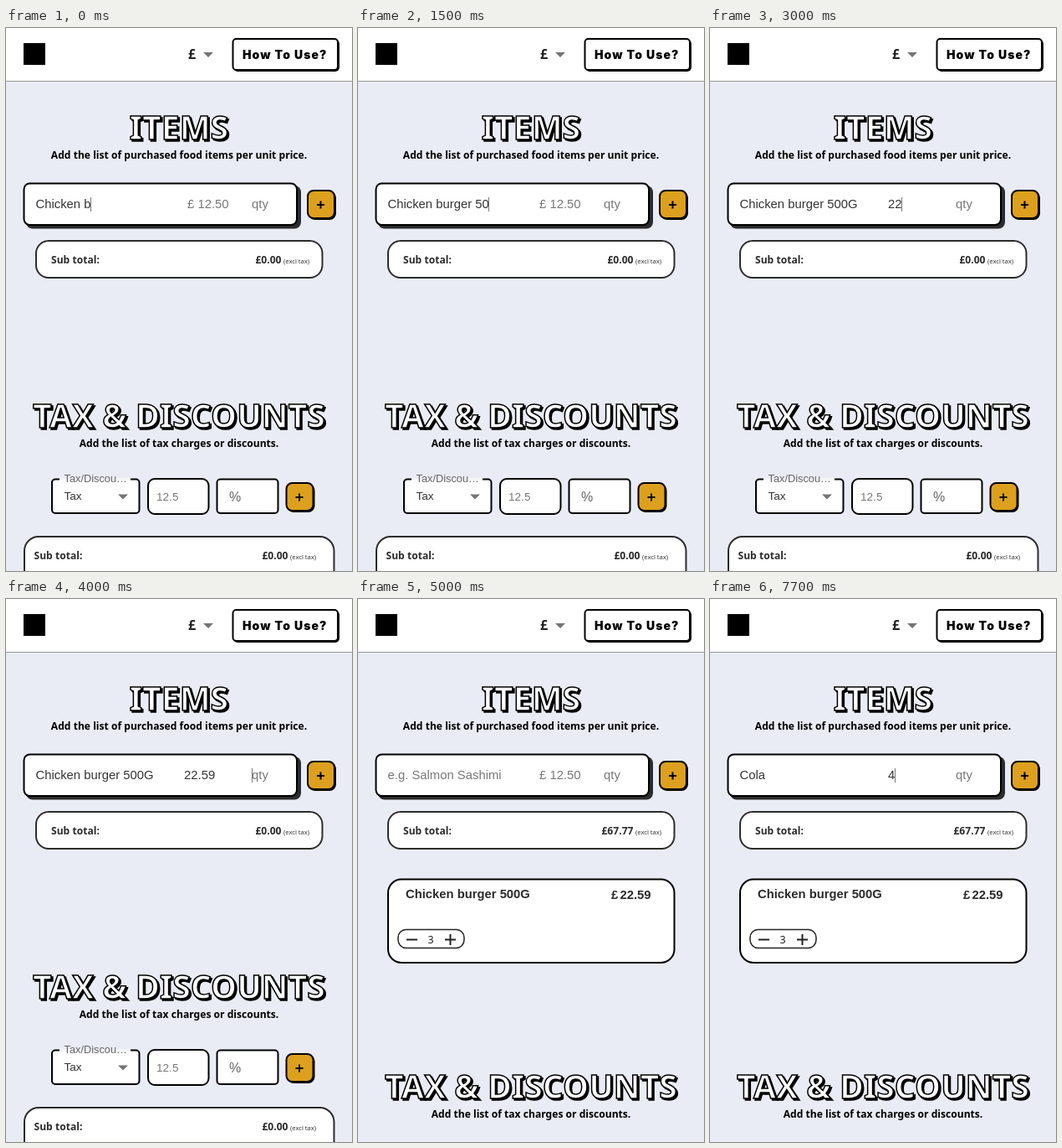
These frames come from a looping animation (414x648 px, 8 s). An HTML page:

```html
<!DOCTYPE html>
<html lang="en">
<head>
<meta charset="utf-8">
<title>Bill items</title>
<style>
  html, body { margin: 0; width: 100%; height: 100%; overflow: hidden; background: #e9ecf4; }
  svg { display: block; width: 414px; height: 648px; }
  .box { fill: #fff; stroke: #000; stroke-width: 2; }
  .soft { stroke: #2c2c2c; }
  .gold { fill: #dda01e; }
  .shade { fill: #2c2c2c; }
  .bold { font: 700 12.1px "Noto Sans", sans-serif; }
  .total { fill: #2b2b2b; }
  .tiny { font: 500 7.6px "Noto Sans", sans-serif; fill: #333; }
  .title { font: 700 39.2px "Noto Sans", sans-serif; text-anchor: middle; stroke: #000; stroke-width: 1.5; }
  .title .front { fill: #fff; }
  .sub { text-anchor: middle; }
  .field { font: 14.85px "Liberation Sans", Arial, sans-serif; fill: #333; }
  .small { font: 13.6px "Liberation Sans", Arial, sans-serif; fill: #333; }
  .label { font-size: 12.8px; fill: #666; }
  .hint { fill: #777; }
  .card { font: 700 14.8px "Liberation Sans", Arial, sans-serif; fill: #2b2b2b; }
  .end { text-anchor: end; }
  .grey { fill: #757575; }
  .how { font: 900 14px Inter, sans-serif; letter-spacing: 1.1px; }
  .line { stroke: #222; stroke-width: 2; fill: none; }
</style>
</head>
<body>
<svg viewBox="0 0 414 648">
  <defs>
    <g id="add">
      <rect x="2" y="2" width="33" height="34" rx="8"/>
      <rect class="box gold" x="1" y="1" width="32" height="33" rx="7"/>
      <path d="M12 18h9M16.500 13.500v9" stroke="#000" stroke-width="2"/>
    </g>
  </defs>

  <path d="M0 0h414v63H0z" fill="#fff"/>
  <path d="M0 63.500h414" stroke="#999"/>
  <rect x="21" y="18" width="26" height="26"/>
  <text x="218" y="37" style="font:600 16px 'Noto Sans',sans-serif" fill="#222">£</text>
  <path class="grey" d="M236 29h12l-6 6z"/>
  <rect x="272" y="14" width="127" height="38" rx="5"/>
  <rect class="box" x="271.500" y="13" width="125.500" height="37" rx="4"/>
  <text class="how" x="283" y="36.500">How To Use?</text>

  <g class="title" transform="translate(207 132.500)">
    <text x="2" y="2">ITEMS</text><text class="front">ITEMS</text>
  </g>
  <text class="bold sub" x="207" y="156">Add the list of purchased food items per unit price.</text>

  <rect class="shade" x="24" y="188" width="329" height="51.500" rx="8"/>
  <rect class="box" x="21.500" y="185.500" width="326.500" height="49.500" rx="7"/>
  <text class="field" id="name" x="35.500" y="215"></text>
  <text class="field" id="price" y="215"></text>
  <text class="field" id="qty" x="294" y="215"></text>
  <path id="caret" d="M.5 202v17" stroke="#777"/>
  <use href="#add" x="360" y="193"/>

  <rect class="box soft" x="36" y="254" width="342.500" height="44" rx="15"/>
  <text class="bold total" x="54" y="281">Sub total:</text>
  <text class="bold total end" id="sum" x="329.500" y="281"></text>
  <text class="tiny" x="332" y="281">(excl tax)</text>

  <g id="card">
    <rect class="box" x="36" y="334.500" width="342.500" height="99.500" rx="16"/>
    <text class="card" x="57" y="357">Chicken burger 500G</text>
    <text class="card" x="303" y="358">£</text>
    <text class="card end" x="350.500" y="358">22.59</text>
    <rect class="box" x="48" y="394.500" width="79" height="22" rx="9.500" style="stroke:#222;stroke-width:1.500"/>
    <path class="line" d="M58 406.500h13M104 406.500h13M110.500 400v13"/>
    <text x="83.500" y="411" style="font:12.500px 'Noto Sans',sans-serif" fill="#222">3</text>
  </g>

  <g id="tax">
    <g class="title" transform="translate(207 477)">
      <text x="2" y="2">TAX &amp; DISCOUNTS</text><text class="front">TAX &amp; DISCOUNTS</text>
    </g>
    <text class="bold sub" x="207" y="500">Add the list of tax charges or discounts.</text>

    <rect class="box" x="55" y="538.500" width="104.500" height="40.500" rx="4"/>
    <path d="M64 538.500h85" stroke="#f4f5f9" stroke-width="3"/>
    <text class="small label" x="69.500" y="542">Tax/Discou…</text>
    <text class="small" x="69.500" y="563">Tax</text>
    <path class="grey" d="M134 556.500h12l-6 6z"/>
    <rect class="box" x="170" y="538" width="72.500" height="42" rx="8"/>
    <text class="small hint" x="180" y="564">12.5</text>
    <rect class="box" x="252.500" y="538.500" width="73" height="40.500" rx="4"/>
    <text class="field" x="267" y="565" style="font-size:16px;fill:#666">%</text>
    <use href="#add" x="334.500" y="542"/>

    <rect class="box soft" x="22" y="607" width="370.500" height="80" rx="17"/>
    <text class="bold total" x="33.500" y="634">Sub total:</text>
    <text class="bold total end" x="337.500" y="634">£0.00</text>
    <text class="tiny" x="340" y="634">(excl tax)</text>
  </g>
</svg>
<script>
const LOOP = 8000, ADDED = 5000;
const $ = id => document.getElementById(id);
const hints = { name: 'e.g. Salmon Sashimi', price: '£ 12.50', qty: 'qty' };

// Each entry: time, focused field, its new value.
const typing = [
  [0, 'name', 'Chicken b'], [200, 'name', 'Chicken bu'], [400, 'name', 'Chicken bur'],
  [600, 'name', 'Chicken burg'], [700, 'name', 'Chicken burge'], [900, 'name', 'Chicken burger'],
  [1100, 'name', 'Chicken burger '], [1300, 'name', 'Chicken burger 5'], [1500, 'name', 'Chicken burger 50'],
  [1700, 'name', 'Chicken burger 500'], [1900, 'name', 'Chicken burger 500G'],
  [2300, 'price', ''], [2700, 'price', '2'], [2900, 'price', '22'], [3200, 'price', '22.'],
  [3600, 'price', '22.5'], [4000, 'price', '22.59'], [4000, 'qty', ''], [4600, 'qty', '3'],
  [ADDED, null], [5900, 'name', ''],
  [6600, 'name', 'C'], [6700, 'name', 'Co'], [7000, 'name', 'Col'], [7200, 'name', 'Cola'],
  [7500, 'price', ''], [7700, 'price', '4']
];

function draw(now) {
  const t = now % LOOP, added = t >= ADDED;
  let values = {}, focus = null;
  for (const [time, field, value] of typing) {
    if (time > t) break;
    focus = field;
    if (field) values[field] = value;
    else values = {};
  }
  for (const id in hints) {
    $(id).textContent = values[id] || hints[id];
    $(id).classList.toggle('hint', !values[id]);
  }
  $('price').setAttribute('x', values.price ? 213 : 217);

  $('caret').style.display = focus ? '' : 'none';
  if (focus) {
    const text = values[focus];
    const start = focus === 'price' ? 213 : +$(focus).getAttribute('x');
    const width = text ? $(focus).getComputedTextLength() : 0;
    $('caret').setAttribute('transform', `translate(${Math.floor(start + width)} 0)`);
  }

  $('sum').textContent = added ? '£67.77' : '£0.00';
  $('card').style.display = added ? '' : 'none';
  $('tax').setAttribute('transform', `translate(0 ${added ? 119 : 0})`);
}

const begin = performance.now();
(function tick() {
  draw(performance.now() - begin);
  requestAnimationFrame(tick);
})();
</script>
</body>
</html>
```
